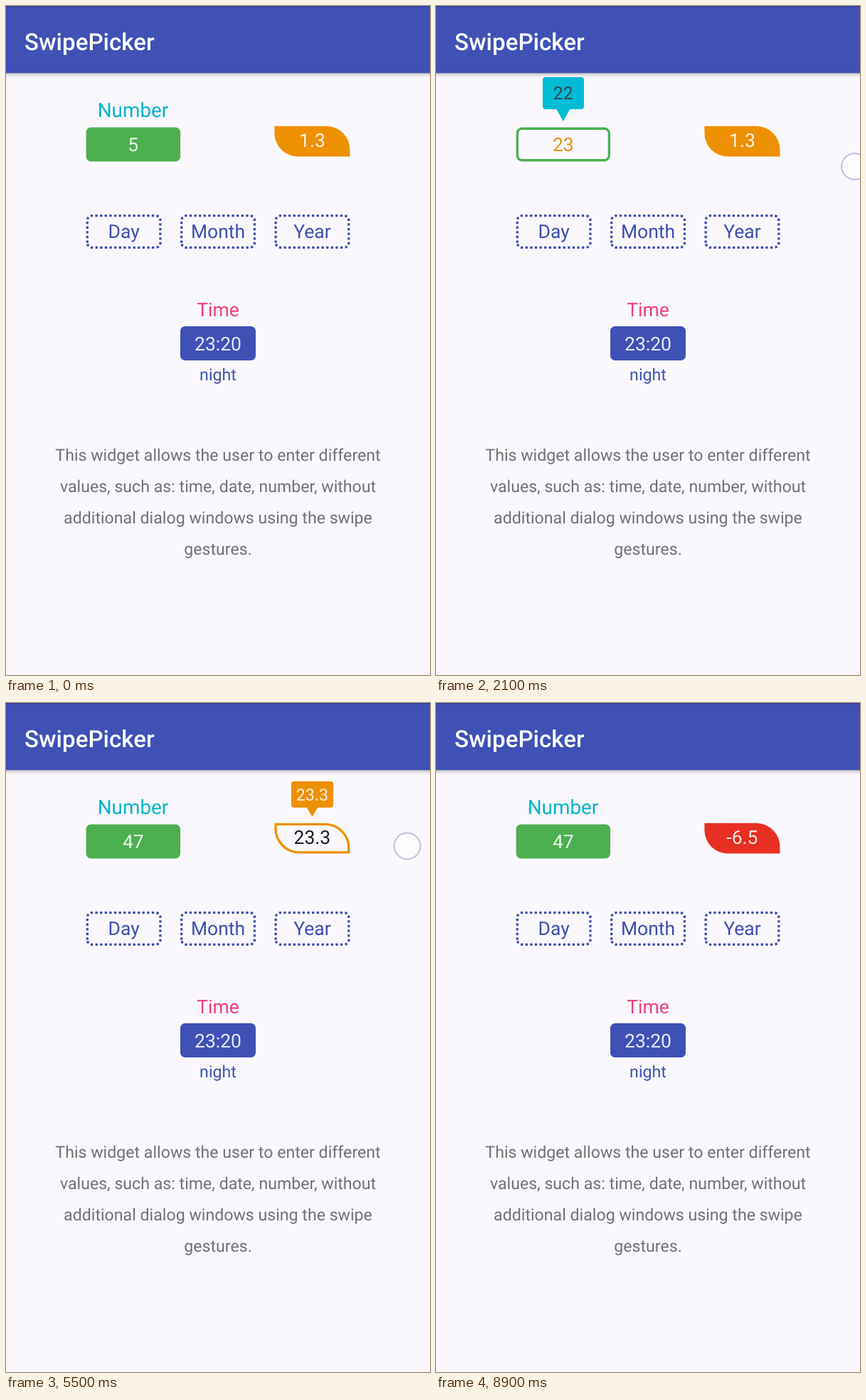
Animation of 596 by 940 pixels, one loop 9000 ms. Source, as an HTML page:

```html
<!DOCTYPE html>
<html lang="en">
<head>
<meta charset="utf-8">
<title>SwipePicker</title>
<style>
html, body { margin: 0; width: 100%; height: 100%; overflow: hidden; background: #faf8fc; }
svg { display: block; width: 596px; height: 940px; }
text { font-family: Roboto, "Noto Sans", sans-serif; text-anchor: middle; text-rendering: geometricPrecision; }
.value { font-size: 26.5px; }
.light { fill: #fff; fill-opacity: .88; }
.dots { fill: none; stroke: #3f4db0; stroke-width: 3.31; stroke-dasharray: 3.31; }
.info { font-size: 23.15px; fill: #727175; }
</style>
</head>
<body>
<svg viewBox="0 0 596 940">
  <defs>
    <linearGradient id="shade" x2="0" y2="1">
      <stop stop-color="#000" stop-opacity=".28"/>
      <stop offset=".4" stop-color="#000" stop-opacity=".1"/>
      <stop offset="1" stop-color="#000" stop-opacity="0"/>
    </linearGradient>
  </defs>
  <rect width="596" height="940" fill="#faf8fc"/>
  <rect y="94" width="596" height="7" fill="url(#shade)"/>
  <rect width="596" height="94.2" fill="#3f51b5"/>
  <rect width="596" height="1.5" fill="#303f9f"/>
  <text x="26" y="61.5" font-size="33.1" font-weight="500" fill="#fff" style="text-anchor:start">SwipePicker</text>

  <text id="hint" x="178.5" y="155.5" font-size="27.9" fill="#00b5cc">Number</text>
  <path id="box"/>
  <text id="boxText" class="value" x="178.8" y="204"/>
  <path id="leaf"/>
  <text id="leafText" class="value" x="430.4" y="197.5"/>

  <g id="fields"></g>

  <text class="value" x="298" y="435.5" fill="#f03e7b">Time</text>
  <rect x="245" y="450" width="106" height="48" rx="6.6" fill="#3f51b5"/>
  <text class="value light" x="298" y="483.5">23:20</text>
  <text x="298" y="526" font-size="23.17" fill="#3f51b5">night</text>
  <g id="info"></g>

  <g id="numberTip" fill="#00bcd4">
    <rect x="150" y="100" width="58" height="45" rx="4"/>
    <path d="M169 144.5H188.5L178.8 162Z"/>
    <text x="178.8" y="131" font-size="24.8" fill="#37424f"></text>
  </g>
  <g id="leafTip" fill="#ee9003">
    <rect y="110" height="37" rx="4"/>
    <path d="M422.5 146.5H438.5L430.5 160Z"/>
    <text class="light" x="430.4" y="137" font-size="23.17"></text>
  </g>
  <circle id="touch" r="18.4" fill="#fff" fill-opacity=".6" stroke="#bcc0de" stroke-opacity=".9" stroke-width="2.2"/>
</svg>
<script>
const $ = id => document.getElementById(id);
const PAPER = '#faf8fc', GREEN = '#4caf50', ORANGE = '#ee9003', RED = '#e73023';
const STROKE = 3.31, PITCH = 132.44;

// Clockwise outline from the lower left; r1 rounds top left and bottom right, r2 the others.
function outline({ x, y, w, h, r1, r2 }, inset) {
  const l = x + inset, t = y + inset, r = x + w - inset, b = y + h - inset;
  const arc = (r, dx, dy) => `a${r} ${r} 0 0 1 ${r * dx} ${r * dy}`;
  return `M${l} ${b - r2}V${t + r1}${arc(r1, 1, -1)}H${r - r2}${arc(r2, 1, 1)}` +
    `V${b - r1}${arc(r1, -1, 1)}H${l + r2}${arc(r2, -1, -1)}Z`;
}

const BOX = { x: 112.6, y: 170.6, w: 132.4, h: 47.8, r1: 6.6, r2: 6.6 };
const LEAF = { x: 377.4, y: 168.8, w: 106, h: 42.8, r1: 0, r2: 33.1 };

$('fields').innerHTML = ['Day', 'Month', 'Year'].map((name, i) => {
  const frame = { x: 112.6 + i * PITCH, y: 293, w: 106, h: 48, r1: 6.6, r2: 6.6 };
  return `<path class="dots" d="${outline(frame, STROKE / 2)}"/>
    <text class="value" x="${165.6 + i * PITCH}" y="326" fill="#3f4db0">${name}</text>`;
}).join('');

$('info').innerHTML = [
  'This widget allows the user to enter different',
  'values, such as: time, date, number, without',
  'additional dialog windows using the swipe',
  'gestures.'
].map((line, i) => `<text class="info" x="298" y="${639 + i * 43.9}">${line}</text>`).join('');

// Keys are [time, value]; linear between them, held at the ends.
function track(keys, t) {
  const next = keys.findIndex(k => k[0] > t);
  if (next === 0) return keys[0][1];
  if (next < 0) return keys[keys.length - 1][1];
  const [t0, a] = keys[next - 1], [t1, b] = keys[next];
  return a + (b - a) * (t - t0) / (t1 - t0);
}

const number = [[700, 5], [1200, 11.9], [3200, 38.1], [3900, 47.2]];
const decimal = [[4300, 1.3], [4600, 2.1], [4900, 6.5], [5500, 23.3], [5700, 24.2],
  [6500, 14], [7400, .1], [7500, -2], [7800, -6.5]];
const firstX = [[600, 185], [1200, 319], [1500, 400], [2200, 620]];
const firstY = [[600, 205], [1200, 221.5], [2200, 226]];
const secondX = [[4300, 436], [4600, 474], [5500, 564], [5700, 560], [6500, 447],
  [7400, 283], [7500, 271], [7800, 249]];
const secondY = [[4300, 198], [4600, 200], [5500, 201], [7400, 214], [7800, 217]];

const between = (t, a, b) => t >= a && t < b;
const show = (el, on) => el.setAttribute('visibility', on ? 'visible' : 'hidden');
function set(el, attrs) {
  for (const name in attrs) el.setAttribute(name, attrs[name]);
}

function paint(id, shape, active, color, activeText, value) {
  set($(id), {
    d: outline(shape, active ? STROKE / 2 : 0),
    fill: active ? PAPER : color,
    stroke: color,
    'stroke-width': active ? STROKE : 0
  });
  const label = $(id + 'Text');
  set(label, { fill: active ? activeText : '#fff', 'fill-opacity': active ? 1 : .88 });
  label.textContent = value;
}

function draw(t) {
  const numberOn = between(t, 600, 3900), numberTip = between(t, 700, 3900);
  paint('box', BOX, numberOn, GREEN, '#ea9010', Math.floor(track(number, t)));
  show($('hint'), !numberTip);
  show($('numberTip'), numberTip);
  $('numberTip').querySelector('text').textContent = Math.floor(track(number, t - 60));

  const leafOn = between(t, 4300, 8000), value = track(decimal, t);
  const shown = value.toFixed(1);
  paint('leaf', LEAF, leafOn, value < 0 ? RED : ORANGE, '#1c1c1e', shown);
  show($('leafTip'), between(t, 4700, 8000));
  const tipText = $('leafTip').querySelector('text');
  tipText.textContent = shown;
  const width = tipText.getComputedTextLength() + 14;
  set($('leafTip').querySelector('rect'), { x: 430.5 - width / 2, width });

  const first = t < 4000;
  show($('touch'), between(t, 600, 2200) || leafOn);
  set($('touch'), {
    cx: track(first ? firstX : secondX, t),
    cy: track(first ? firstY : secondY, t)
  });
}

const start = performance.now();
function tick() {
  draw(Math.floor((performance.now() - start) % 9000 / 100) * 100);
  requestAnimationFrame(tick);
}
tick();
</script>
</body>
</html>
```
